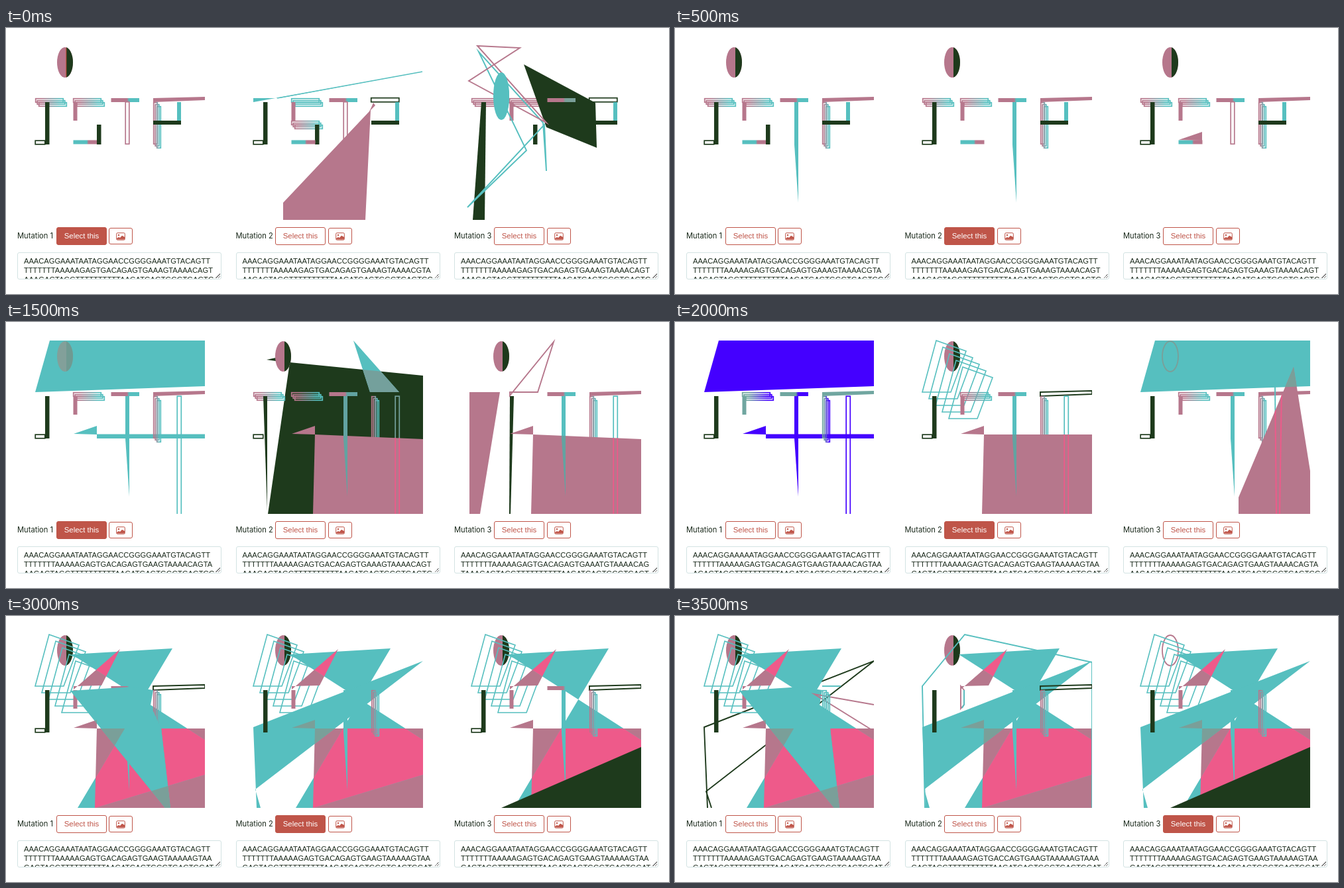
Animation, 1000 px wide and 402 px high, one loop 4 s. Source, as an HTML page with a canvas:

```html
<!DOCTYPE html>
<html lang="en">
<head>
<meta charset="utf-8">
<title>Mutations</title>
<style>
  html, body { margin: 0; width: 100%; height: 100%; overflow: hidden; background: #fff; }
  #stage { position: relative; width: 1000px; height: 402px; overflow: hidden; color: #1b2a1c; }
  canvas, .label, .btn, .gene { position: absolute; box-sizing: border-box; }
  canvas { left: 0; top: 0; }
  .label { top: 306px; font: 11.2px/16px Inter, sans-serif; white-space: pre; }
  .btn {
    top: 301px; width: 76px; height: 27px; border: 1px solid #bf5549; border-radius: 3px;
    color: #bf5549; font: 11.4px/25px "Liberation Sans", Arial, sans-serif; text-align: center;
  }
  .btn.on { background: #bf5549; color: #fff; }
  .icon { top: 302px; width: 36px; height: 25px; }
  .icon svg { position: absolute; left: 10px; top: 6px; }
  .gene {
    top: 339px; width: 308px; height: 41px; padding: 5px 9px; overflow: hidden;
    border: 1px solid #d3e3e3; border-radius: 3px; white-space: pre; font-kerning: none;
    font: 11.15px/14px "Liberation Sans", Arial, sans-serif;
  }
  .gene::after {
    content: ""; position: absolute; right: 1px; bottom: 1px; width: 7px; height: 7px;
    background: linear-gradient(135deg, #fff 50%, #777 50% 58%, #fff 58% 75%, #777 75% 84%, #fff 84%);
  }
</style>
</head>
<body>
<div id="stage"><canvas id="art" width="1000" height="402"></canvas></div>
<script>
const PINK = "#b6778c", TEAL = "#56bfbf", DARK = "#1e3a1c", RED = "#bf5549",
      HOT = "#ee5a8a", BLUE = "#4400ff", MINT = "#80e4c9", GRAY = "#7a9f99", SEA = "#62a3a1";
const stage = document.getElementById("stage");
const ctx = document.getElementById("art").getContext("2d");

// Drawing helpers; every panel uses the same local coordinates.
function trace(pts, closed = true) {
  ctx.beginPath();
  for (const p of pts.split(" ")) ctx.lineTo(...p.split(",").map(Number));
  if (closed) ctx.closePath();
}
function fill(pts, c) { trace(pts); ctx.fillStyle = c; ctx.fill(); }
function line(pts, c, closed = true, w = 1.9) {
  trace(pts, closed);
  ctx.strokeStyle = c;
  ctx.lineWidth = w;
  ctx.stroke();
}
function box(x, y, w, h, c) { ctx.fillStyle = c; ctx.fillRect(x, y, w, h); }
function frame(x, y, w, h, c) {
  ctx.strokeStyle = c;
  ctx.lineWidth = 1.7;
  ctx.strokeRect(x + .7, y + .7, w - 1.4, h - 1.4);
}
function inside(pts, draw) {
  ctx.save();
  trace(pts);
  ctx.clip();
  draw();
  ctx.restore();
}
function bars(x, y, w, h, a, b) {
  const g = ctx.createLinearGradient(x, 0, x + w + 5, 0);
  g.addColorStop(.2, a);
  g.addColorStop(.8, b);
  for (let i = 0; i < 3; i++) frame(x + i * 2.5, y + i * 3, w, h, g);
}
function split(x, y, w, a, b) {
  const g = ctx.createLinearGradient(x, 0, x + w, 0);
  g.addColorStop(.56, a);
  g.addColorStop(.64, b);
  box(x, y, w, 6, g);
}
function oval(x, y, rx, ry, a, b = a, cut = x + 2) {
  const disc = () => { ctx.beginPath(); ctx.ellipse(x, y, rx, ry, 0, 0, 7); ctx.fill(); };
  ctx.fillStyle = a;
  disc();
  ctx.save();
  ctx.beginPath();
  ctx.rect(cut, 0, 100, 300);
  ctx.clip();
  ctx.fillStyle = b;
  disc();
  ctx.restore();
}
function ring(x, y, rx, ry, c) {
  ctx.beginPath();
  ctx.ellipse(x, y, rx, ry, 0, 0, 7);
  ctx.strokeStyle = c;
  ctx.lineWidth = 1.8;
  ctx.stroke();
}

// Parts of the lettering
const TAIL = "180,112 186,112 186,264 180,176";
const FLAT = "137,170 300,170 300,290 134,290";
const SLOPE = "137,170 300,177 300,290 134,290";
const TRI = "102,169 137,157 137,170";
const SKY = "66,28 300,28 300,97 44,106";
const WEDGE = "222,106 300,104 300,109 222,112";
const STAR = "99,58 251,49 108,290 135,290 300,240 300,187";
const KITE = "172,50 144,105 102,106 102,111";
const BAND = "44,168 300,68 47,262 55,290 49,290";
const FAN = "97,113 190,107 222,112 218,135 234,170 248,290 240,290";

const head = () => oval(89, 52, 12, 23, PINK, DARK);
const seam = () => box(90, 30, 1.3, 44, RED);
const jTop = (a = PINK, b = TEAL) => bars(44, 106, 43, 7, a, b);
const jStem = () => box(59, 112, 6.5, 64, DARK);
const jFoot = () => frame(43.5, 169.5, 16, 7, DARK);
const jay = () => { jStem(); jFoot(); };
const sTop = (a = PINK, b = TEAL) => bars(101, 106, 43, 7, a, b);
const sLeft = (c = PINK) => box(101.5, 112, 6, 28, c);
const sRight = () => box(137, 146, 6.5, 30, DARK);
const sFoot = (c = PINK) => split(101.5, 169.5, 36, TEAL, c);
const tTop = (a = PINK, b = TEAL) => split(158.5, 106, 42.5, a, b);
const tStem = () => frame(179.5, 111, 7, 65, PINK);
const tail = (c = TEAL) => fill(TAIL, c);
const tee = (a, b) => { tTop(a, b); tail(b); };
const pStem = (a = PINK, b = TEAL) => bars(222, 112, 7, 64, a, b);
const pRight = () => box(258, 112, 6, 28, TEAL);
const pMid = () => box(222, 140, 42, 6, DARK);
const post = (c = TEAL) => frame(257.5, 111.5, 7.5, 200, c);
const pee = (a = PINK, b = TEAL) => { fill(WEDGE, a); pStem(a, b); };
function quads(c = TEAL) {
  for (let i = 0; i < 5; i++) {
    ctx.save();
    ctx.translate(i * 10, i * 10);
    line("65,28 110,44 87,106 44,106", c, true, 1.6);
    ctx.restore();
  }
}
function slab(shape) {
  fill(TRI, PINK);
  fill(shape, PINK);
  inside(shape, () => { tail(SEA); post(HOT); });
}
function basic() {
  head(); jTop(); jay(); sTop(); sLeft(); sFoot(); tTop(); pee(); pRight();
}
function star() {
  fill(TRI, PINK);
  fill(FLAT, PINK);
  fill(KITE, PINK);
  fill(STAR, TEAL);
  inside(STAR, () => { fill(FLAT, HOT); fill(KITE, HOT); });
}
function sweep(shape) {
  fill(shape, TEAL);
  for (const under of [TRI, FLAT]) {
    inside(under, () => {
      fill(shape, GRAY);
      inside(shape, () => fill(STAR, TEAL));
    });
  }
}
function roof(c, tone, end) {
  fill(SKY, c);
  jay(); sLeft(tone); sTop(tone, end); tee(tone, end);
  fill(TRI, c);
  box(137, 169.5, 163, 6.5, c);
  pee(tone, end);
  post(c);
}
function starry() {
  head(); quads(); jay(); sLeft(); star(); tTop(); tail();
  line(WEDGE, DARK); pStem();
}

const HEAD = "AAACAGGAAATAATAGGAACCGGGGAAATGTACAGTT";
const MID = "AAAAAGAGTGACAGAGTG";
const LAST = "TAAAGAGTAGG" + "T".repeat(10) + "AAGATGAGTGGGTGAGTGGATGA";
const gene = (end, cut, ts = 7, top = HEAD, mid = MID) =>
  [top, "T".repeat(ts) + mid + end, LAST.slice(cut, cut + 38)].join("\n");
const G1 = gene("AAAGTAAAACAGT", 1);
const G2 = gene("AAAGTAAAACGTA", 2);
const G3 = gene("AAGTAAAACAGTA", 2);
const G4 = gene("AAGTAAAAAGTAA", 4);

const steps = [
  { pick: 0, genes: [G1, G2, G1], art: [
    () => { basic(); seam(); sRight(); tStem(); pMid(); },
    () => {
      fill("44,106 84,106 299,66 44,112", TEAL);
      line("80,106 299,66", TEAL, false, 1.4);
      jay(); sTop(TEAL, TEAL); sLeft(); bars(101, 140, 43, 7, PINK, TEAL);
      sRight(); sFoot(); tTop(); tStem();
      frame(221, 105, 43.5, 7.5, DARK); pRight(); pMid();
      fill("89,264 219,126 222,120 225,113 228,117 221,124 213,290 89,290", PINK);
    },
    () => {
      jTop(PINK, PINK); sTop(PINK, PINK); sLeft(); sRight();
      fill("59,112 66,112 64,290 46,290", DARK);
      fill("123,55 231,113 233,181 157,150", DARK);
      tTop(PINK, GRAY);
      line("55,36 127,185 38,271 154,146 157,216 152,143", TEAL);
      line("53,27 117,30 40,80 157,143", PINK);
      oval(89, 103, 12, 36, TEAL);
      frame(221, 105, 43.5, 7.5, DARK); pRight(); pMid();
    }] },
  { pick: 1, genes: [G2, G1, G1], art: [
    () => { basic(); sRight(); tail(); pMid(); },
    () => { basic(); tail(); pMid(); },
    () => { basic(); tStem(); fill(TRI, PINK); pMid(); }] },
  { pick: 2, genes: [G1, gene("AAAGTAAAACAG", 0, 8, HEAD.replace("TGTACAGTT", "TGATACAGT")), G1], art: [
    () => {
      const fin = "222,120 222,176 90,264";
      fill("64,58 300,81 300,127 102,112", DARK);
      head(); seam(); jTop(); jay(); sTop(); sFoot();
      fill("222,147 264,146 264,139 300,143 300,154", DARK);
      fill(fin, PINK);
      tee();
      inside(fin, () => tail(SEA));
      fill(WEDGE, PINK); pRight();
    },
    () => {
      oval(91, 93, 15, 58, DARK, RED, 95);
      jTop(RED, TEAL); jay(); sTop(RED, TEAL); sLeft(RED); sFoot(RED);
      tee(RED, TEAL); pee(RED, TEAL); pRight();
      fill("222,146 264,139 264,146", DARK);
    },
    () => { head(); jTop(); jay(); sTop(); sLeft(); tee(); pee(); post(); slab(SLOPE); }] },
  { pick: 0, genes: [G3, G1, gene("AAATGTAAAACAG", 0)], art: [
    () => {
      roof(TEAL, PINK, TEAL);
      oval(89, 52, 12, 23, "#82a09a", "#6f9a92");
    },
    () => {
      const hill = "99,61 300,81 300,290 66,290", flag = "195,28 264,106 220,106";
      fill(hill, DARK);
      fill(flag, TEAL);
      inside(hill, () => fill(flag, "#74a09c"));
      fill("64,57 78,54 78,59", DARK);
      head(); jTop(); sTop(); jFoot();
      fill("59,112 65,112 65,285", DARK);
      tee(PINK, SEA); pStem(); post("#74a09c"); slab(SLOPE);
    },
    () => {
      head();
      fill("41,106 87,106 57,290 41,290", PINK);
      fill("102,112 108,112 103,290 101,290", DARK);
      line("102,111 102,106 144,106 168,30", PINK);
      tee(); pee(); post(); slab(SLOPE);
    }] },
  { pick: 1, genes: [
      gene("AAGTAAAACAGTAA", 3, 6, "AAACAGGAAAAATAGGAACCGGGGAAATGTACAGTTT"), G4, G3], art: [
    () => roof(BLUE, "#70a6a0", BLUE),
    () => {
      head(); quads(); jay(); sTop(); sLeft(); tee();
      line(WEDGE, DARK); pStem(); post(); slab(FLAT);
    },
    () => {
      const peak = "275,68 300,225 300,290 192,290 192,265";
      fill(SKY, TEAL);
      ring(89, 52, 12, 23, GRAY);
      jay(); sTop(); sLeft(); tee(); pee();
      line("247,97 249,290", TEAL, false);
      fill(peak, PINK);
      inside(peak, () => {
        fill(SKY, GRAY);
        line("247,97 249,290", HOT, false);
        line("257,97 254,290", HOT, false);
      });
    }] },
  { pick: 0, genes: [G4, G4,
      gene("AAGTAAAAAGTA", 3, 8, "AAACAGGATAATAATAGGAACCGGGGAAATGTACAGT")], art: [
    starry,
    () => {
      const spike = c => line("249,290 247,92 259,106 257,290", c, false);
      head(); quads(); jay(); sTop(PINK, PINK); sLeft(); tee();
      fill("222,106 300,106 300,111 222,112", TEAL);
      pStem(); spike(TEAL);
      fill(TRI, PINK); fill(FLAT, PINK);
      inside(FLAT, () => { tail(SEA); spike(HOT); });
    },
    () => {
      line("53,27 117,30 40,80 157,143", RED);
      fill("39,104 222,108 228,176 141,162", MINT);
      sTop(MINT, RED);
      ring(185, 91, 50, 12, MINT);
      tTop(RED, GRAY);
      oval(89, 103, 12, 36, DARK);
      quads(MINT);
      line("43,115 154,144 38,271 127,267", RED);
      line("59,148 47,290", DARK, false);
      line(WEDGE, DARK);
      post(MINT);
      fill("294,154 294,290 270,290", MINT);
    }] },
  { pick: 1, genes: [G4, G4, G4], art: [
    () => { starry(); sweep(FAN); },
    () => { head(); quads(); sLeft(); star(); sweep(BAND); jStem(); tail(); pStem(); },
    () => { starry(); fill("300,198 300,290 89,290", DARK); }] },
  { pick: 2, genes: [G4, gene("AAGTAAAAAGTAAA", 4, 7, HEAD, "AAAAAGAGTGACCAGTG"), G4], art: [
    () => {
      line("49,290 44,168 300,68 47,265 55,290", DARK, false);
      head(); quads(); jStem(); sLeft(); star(); sweep(FAN);
      line("300,134 210,118 300,174", PINK, false);
      line("222,106 250,106", TEAL, false);
      pStem(TEAL, TEAL);
    },
    () => {
      head(); star(); sweep(BAND); jStem(); tail();
      line("48,290 44,106 108,28 300,70 300,290", TEAL, false);
      line("102,106 102,140 107,134 107,112", PINK);
      line("104,139 107,134 107,112", TEAL, false);
      line(WEDGE, DARK); pStem();
    },
    () => {
      ring(89, 52, 12, 23, PINK);
      quads(); sLeft(); star(); sweep(BAND); jStem(); tail(); pStem();
      fill("300,198 300,290 89,290", DARK);
    }] }
];

function add(cls, x, html) {
  const el = document.createElement("div");
  el.className = cls;
  el.style.left = x + "px";
  el.innerHTML = html;
  stage.append(el);
  return el;
}
const picture = `<svg width="14" height="12" viewBox="0 0 14 12" fill="none" stroke="#bf5549">
  <rect x=".7" y=".7" width="12.6" height="10.6" rx="1.5"/>
  <circle cx="4" cy="4" r="1.2" fill="#bf5549" stroke="none"/>
  <path d="M1 10.5V9l3-2 2 1 3-3.2L13 7v3.5z" fill="#bf5549" stroke="none"/></svg>`;
const panels = [0, 1, 2].map(i => {
  const x = 17 + i * 329.5;
  add("label", x, "Mutation " + (i + 1));
  const btn = add("btn", 76 + i * 330, "Select this");
  add("btn icon", 155 + i * 330.5, picture);
  return { btn, text: add("gene", x, "") };
});

function show({ pick, genes, art }) {
  ctx.clearRect(0, 0, 1000, 402);
  panels.forEach((p, i) => {
    p.btn.classList.toggle("on", i === pick);
    p.text.textContent = genes[i];
    ctx.save();
    ctx.translate(i * 329, 0);
    ctx.beginPath();
    ctx.rect(36, 26, 264, 264);
    ctx.clip();
    art[i]();
    ctx.restore();
  });
}

let shown = -1;
function tick() {
  const n = Math.floor(performance.now() % 4000 / 500);
  if (n !== shown) show(steps[shown = n]);
  requestAnimationFrame(tick);
}
tick();
</script>
</body>
</html>
```
